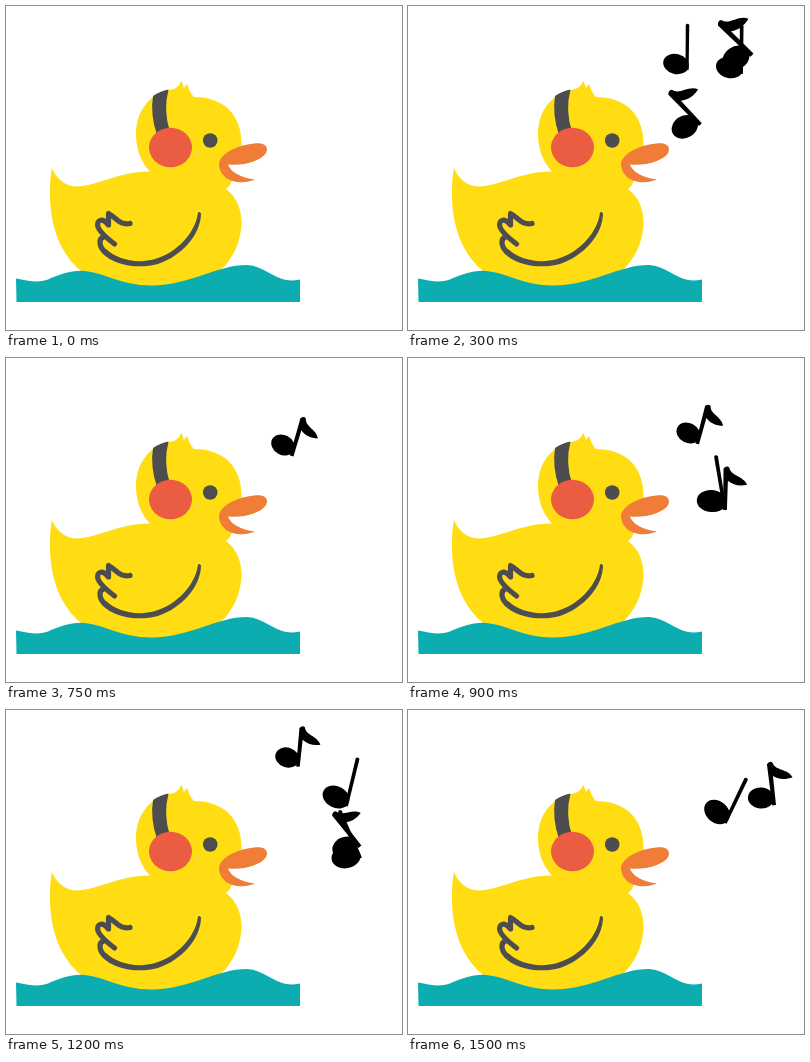
Recreate the animation shown at these times as an HTML page. Size 396x324 px, loop 1.65 s.

```html
<!DOCTYPE html>
<html lang="en">
<head>
<meta charset="utf-8">
<title>Singing duck</title>
<style>
  html, body { margin: 0; width: 100%; height: 100%; overflow: hidden; background: #fff; }
  svg { display: block; width: 396px; height: 324px; }
</style>
</head>
<body>
<svg viewBox="0 0 396 324">
  <defs>
    <g id="quarter">
      <ellipse rx="12.7" ry="9.8" transform="rotate(14)"/>
      <path d="M9.300 6L9.600 -38.500Q11.300 -40.500 13 -38.500L12.400 6Z"/>
    </g>
    <g id="eighth">
      <ellipse rx="11.700" ry="9.400" transform="rotate(14)"/>
      <path d="M9 8L9.400 -29Q12 -32 14.500 -30C16 -22 27 -23 30.500 -14.500C24 -13 18 -14 13.300 -18L12.400 8Z"/>
    </g>
  </defs>

  <path fill="#ffdd12" d="M163 84Q169 83 171 81Q174 79 175 75Q177 78 178 82L181 78Q184 87 188 91C217 91 236 108 235.500 139L220 157L221 168L226 174Q225 179 220 183C231 191 236 204 235.500 219C234 238 227 252 215 264L200 285H95L78 267C54 250 43 218 44 184Q44 171 46 162C50 172 58 180 70 180.500C92 180 114 165 144 165.500C135 156 130 143 130 128C130 106 143 88 163 84Z"/>
  <path fill="#0cadb0" d="M10 272.500C22 275 32 277 42 273.500C55 268 66 264 78 265C100 267 115 279.500 145 279.500C186 279 210 259 241 259C257 260 268 272 280 274Q287 275 294 273.500V296H10.500Z"/>

  <g fill="#4d4d4f">
    <path d="M147 90Q154 85 162.500 83.500Q157 104 164 126L151 129Q144 108 147 90Z"/>
    <circle cx="204.200" cy="134.500" r="7.300"/>
    <path d="M192 206.500Q193.500 205 195 207.500C195 228 176 250 152 258C130 264 106 258 96 247L100 243C112 254 131 258 149 253C173 246 190 225 192 206.500Z"/>
    <path d="M124 217.500C113 219.500 110 211 102.500 207.500L102.500 219C96 211 90 214 92 221C94 227 102 233 108.500 238M98 231C92 232 93 241 99 246" fill="none" stroke="#4d4d4f" stroke-width="5.200" stroke-linecap="round" stroke-linejoin="round"/>
  </g>
  <ellipse cx="164.500" cy="141.500" rx="21.500" ry="19.700" fill="#ea5d42"/>
  <path fill="#ef7d37" d="M213 158C214 148 230 139 250 137.300C259 136.500 263 141 260 147C255 155 238 160 222 158.500C225 167 236 172 249 173.300C240 178 226 177 219 171C215 167 213 163 213 158Z"/>

  <g id="notes"></g>
</svg>
<script>
  const STEP = 150, STEPS = 11;
  const layer = document.getElementById('notes');
  const notes = [];

  // A pose is x, y, degrees; bow bends the way between the two ends.
  function float(shape, size, first, last, from, to, bow = [0, 0, 0]) {
    const el = document.createElementNS('http://www.w3.org/2000/svg', 'use');
    el.setAttribute('href', '#' + shape);
    layer.appendChild(el);
    notes.push({ el, size, first, last, from, to, bow });
  }

  // first verse
  float('quarter', 1.02, 1, 3, [265, 69, 5], [271, 47, -5]);
  float('eighth', 1.18, 1, 4, [276, 136, -36], [278.5, 97, -40], [0, -2.5, -9]);
  float('quarter', 1.08, 1, 2, [332, 68, 5], [321.5, 61.5, 0]);
  float('eighth', 1.22, 1, 2, [337, 58, -40], [328, 52, -47]);

  // second verse
  float('eighth', 1.05, 5, 9, [277, 87, 15], [279, 32, -4], [4, 2.5, 5]);
  float('eighth', 1.12, 6, 10, [305, 143, 0], [353, 88, -8], [10, 22, -36]);
  float('quarter', 1.12, 6, 7, [303, 143, -10], [310, 127, -25]);
  float('quarter', 1.15, 7, 8, [333, 154, 20], [340, 147, -24]);
  float('quarter', 1.1, 8, 10, [330, 87, 13], [309, 102, 25]);

  function draw(time) {
    const step = Math.floor(time / STEP) % STEPS;
    for (const { el, size, first, last, from, to, bow } of notes) {
      const u = (step - first) / (last - first);
      const shown = u >= 0 && u <= 1;
      el.setAttribute('visibility', shown ? 'visible' : 'hidden');
      if (!shown) continue;
      const bend = Math.sin(Math.PI * u);
      const [x, y, turn] = from.map((a, i) => a + (to[i] - a) * u + bow[i] * bend);
      el.setAttribute('transform', `translate(${x} ${y}) rotate(${turn}) scale(${size})`);
    }
  }

  const start = performance.now();
  function tick(now) {
    draw(Math.max(0, now - start));
    requestAnimationFrame(tick);
  }
  draw(0);
  requestAnimationFrame(tick);
</script>
</body>
</html>
```
